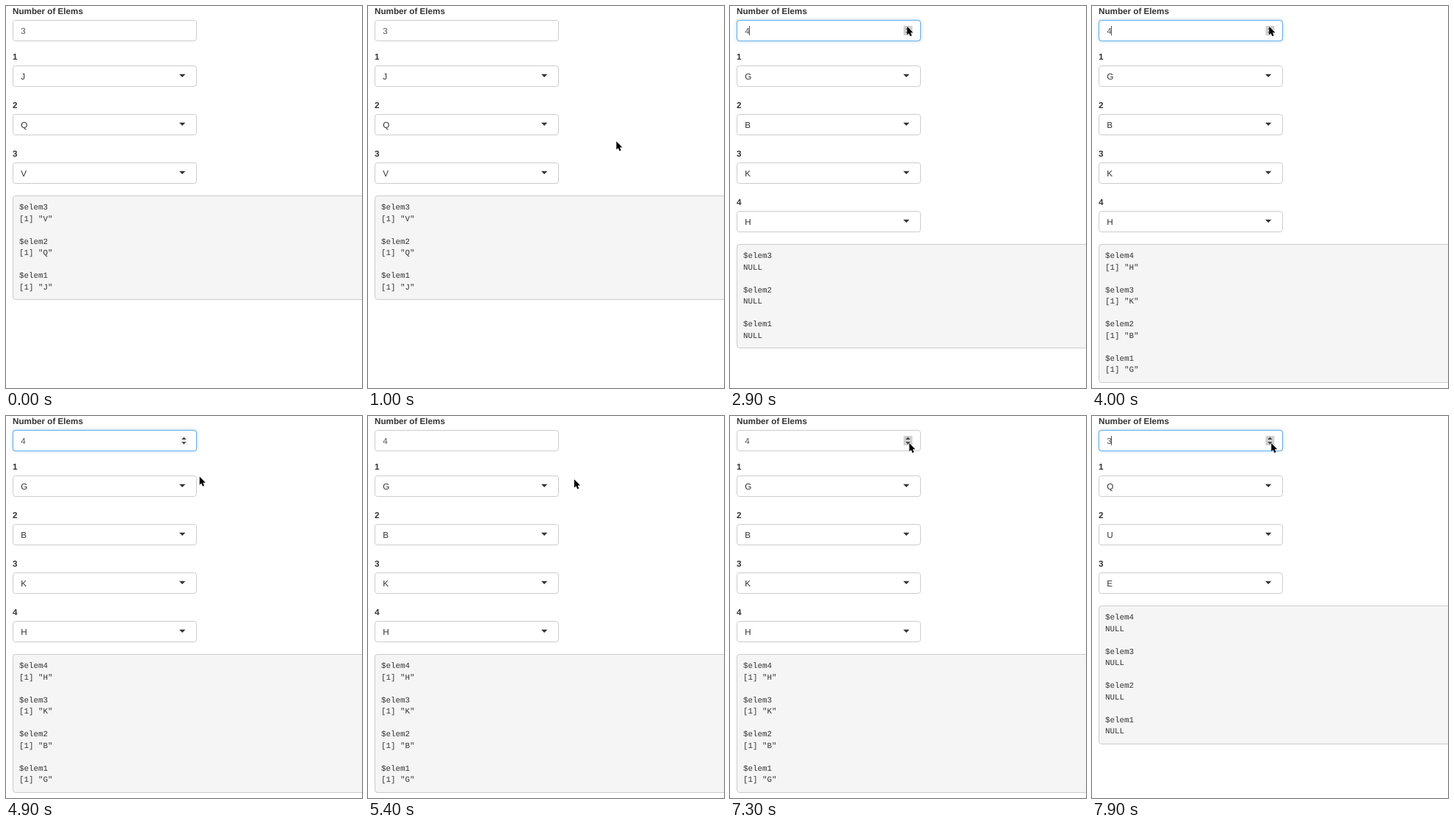
An HTML page for the animation above (8000 ms loop, 485x520 px).

```html
<!DOCTYPE html>
<html lang="en">
<head>
<meta charset="utf-8">
<title>Dynamic inputs</title>
<style>
  html, body { margin: 0; width: 100%; height: 100%; overflow: hidden; background: #fff; }
  svg { display: block; width: 485px; height: 520px; }
  text { font: 11.67px "Liberation Sans", Arial, sans-serif; fill: #333; text-rendering: geometricPrecision; white-space: pre; }
  .label { font-weight: bold; }
  .number { fill: #555; }
  .code { font: 10.83px "Liberation Mono", monospace; }
  .box { fill: #fff; stroke: #ccc; }
  .glow { fill: #fff; filter: drop-shadow(0 0 2.6px #66afe9); }
  .focus { fill: none; stroke: #66afe9; }
  .pre { fill: #f5f5f5; stroke: #ccc; }
  .pointer { fill: #000; stroke: #fff; stroke-width: .8; paint-order: stroke; }
</style>
</head>
<body>
<svg id="stage" viewBox="0 0 485 520"></svg>
<script>
const LOOP = 8000, TICK = 100, PITCH = 66, LINE = 15.5;
const CLICK_UP = 2800, BLUR = 5100, CLICK_DOWN = 7800, BLINK = 600, FADE = 150;
const stage = document.getElementById('stage');

// each move runs from start to end and stops at x, y; bends are easing powers
const moves = [
  { start: 400, end: 1200, x: 257, y: 37.5, bendX: 6, bendY: 1.3 },
  { start: 1200, end: 1600, x: 241, y: 33 },
  { start: 1900, end: 2300, x: 241.3, y: 28 },
  { start: 4200, end: 4600, x: 286, y: 102 },
  { start: 4700, end: 4900, x: 263.7, y: 82.5 },
  { start: 5000, end: 5700, x: 294, y: 89 },
  { start: 6000, end: 6900, x: 241, y: 31, bendX: .45, bendY: .9 },
  { start: 7100, end: 7300, x: 244.3, y: 37 }
];

const clamp = v => Math.min(1, Math.max(0, v));

function pointerAt(t) {
  if (t < moves[0].start) return null;
  let x = 356, y = 508;
  for (const m of moves) {
    const p = clamp((t - m.start) / (m.end - m.start));
    x += (m.x - x) * p ** (m.bendX || 1);
    y += (m.y - y) * p ** (m.bendY || 1);
  }
  return { x, y };
}

const lettersAt = t => t < CLICK_UP ? 'JQV' : t < CLICK_DOWN ? 'GBKH' : 'QUE';

// the selects follow a click one tick late, their printed values two ticks late
function stateAt(t) {
  const letters = lettersAt(t - TICK), previous = lettersAt(t - 2 * TICK);
  const values = letters === previous ? [...letters] : Array(previous.length).fill(null);
  return { count: lettersAt(t).length, letters, values };
}

function focusAt(t) {
  const fade = from => clamp((t - from) / FADE + .5);
  const since = from => t < from ? 0 : fade(from);
  return since(CLICK_UP) - since(BLUR) + since(CLICK_DOWN);
}

function caretAt(t) {
  const click = t < CLICK_DOWN ? CLICK_UP : CLICK_DOWN;
  const active = t >= click && (t < BLUR || t >= CLICK_DOWN);
  return active && (t - click) % (2 * BLINK) < BLINK;
}

const inside = (p, x0, y0, x1, y1) => p && p.x >= x0 && p.x <= x1 && p.y >= y0 && p.y <= y1;
const text = (cls, x, y, s) => `<text class="${cls}" x="${x}" y="${y}">${s}</text>`;
const rect = (cls, x, y, w, h, opacity = 1) =>
  `<rect class="${cls}" x="${x}" y="${y}" width="${w}" height="${h}" rx="3.3" opacity="${opacity}"/>`;
const field = (cls, y, opacity) => rect(cls, 9.5, y, 250, 28, opacity);

function spinner(pointer) {
  const shade = inside(pointer, 236, 27, 248, 40) ? '#d0d0d0' : '#f7f7f7';
  return `<path d="M236.5 27h12v13h-12z" fill="${shade}"/>`
    + '<path d="M239.2 32l3.2-3.3 3.2 3.3zM239.2 35.2l3.2 3.3 3.2-3.3z" fill="#3a3a3a"/>';
}

function numberInput(count, t, pointer) {
  const focus = focusAt(t);
  return text('label', 9, 10.6, 'Number of Elems')
    + (focus ? field('glow', 19.5, focus * .6) : '')
    + field('box', 19.5) + field('focus', 19.5, focus)
    + text('number', 20.2, 37.7, count)
    + (caretAt(t) ? '<path d="M26 27h1v13h-1z" fill="#555"/>' : '')
    + (focus || inside(pointer, 10, 20, 256, 47) ? spinner(pointer) : '');
}

function select(letter, i) {
  const y = 81.5 + PITCH * i;
  return text('label', 9, y - 8.9, i + 1)
    + field('box', y)
    + text('', 20.2, y + 18.1, letter)
    + `<path d="M236 ${y + 11.2}h8.4l-4.2 4.2z" fill="#333"/>`;
}

// blocks are listed from the last element to the first
function output(values, top) {
  const blocks = values.map((v, i) => [`$elem${i + 1}`, v ? `[1] "${v}"` : 'NULL', '']);
  const lines = blocks.reverse().flat().slice(0, -1);
  return rect('pre', 9.5, top, 490, Math.round(lines.length * LINE + 17))
    + lines.map((s, i) => text('code', 17.9, top + 18.8 + LINE * i, s)).join('');
}

function scene(t) {
  const { count, letters, values } = stateAt(t);
  const pointer = pointerAt(t);
  return numberInput(count, t, pointer)
    + [...letters].map(select).join('')
    + output(values, 60.5 + PITCH * letters.length)
    + (pointer ? `<path class="pointer" transform="translate(${pointer.x} ${pointer.y})"
        d="M0 0V11.2L2.5 9 4.3 13.2 6.3 12.3 4.6 8.2H8.1Z"/>` : '');
}

const start = performance.now();
let shown = -1;
function frame() {
  const elapsed = Math.max(0, performance.now() - start) % LOOP;
  const t = Math.floor(elapsed / TICK) * TICK;
  if (t !== shown) {
    stage.innerHTML = scene(t);
    shown = t;
  }
  requestAnimationFrame(frame);
}
frame();
</script>
</body>
</html>
```
